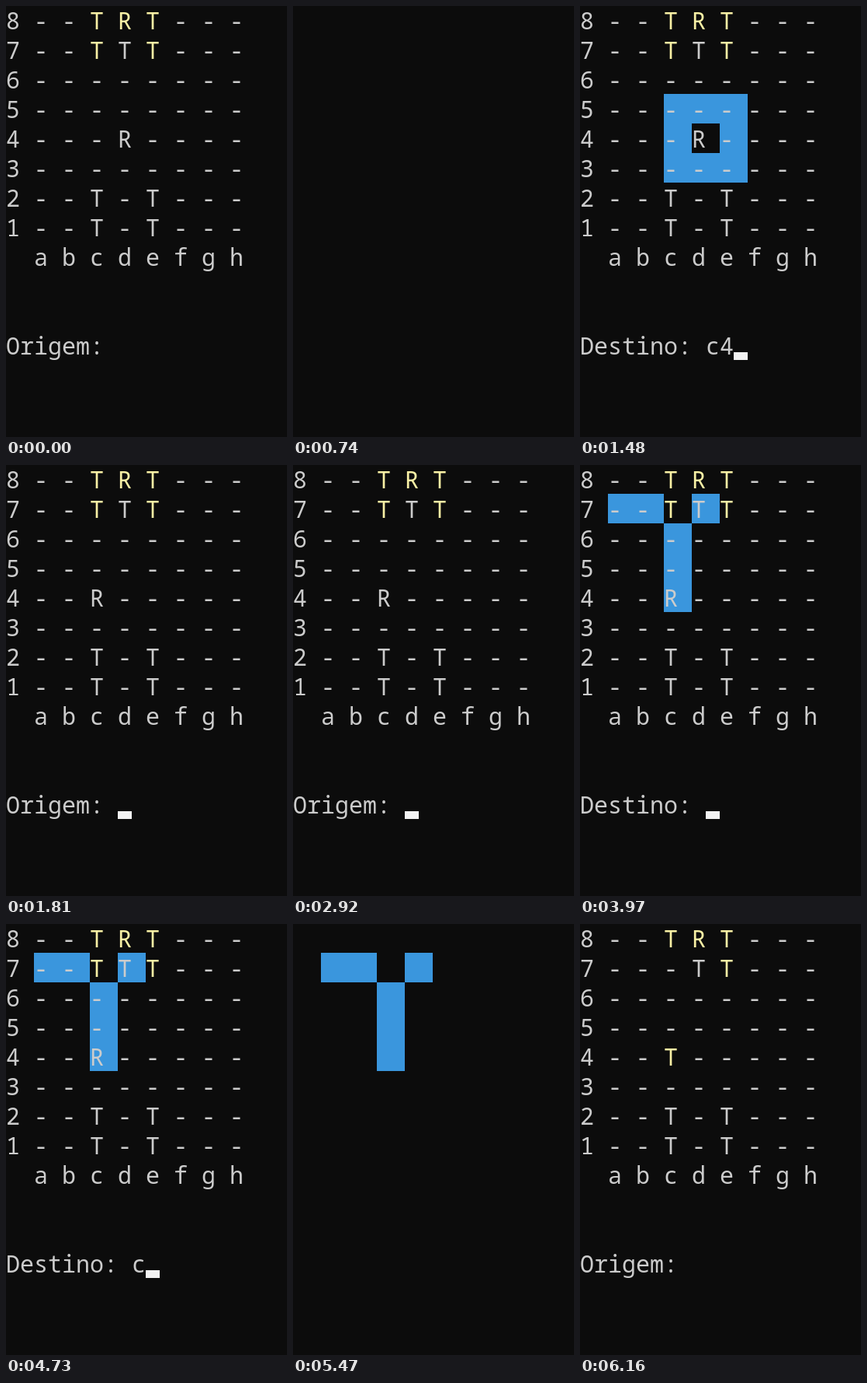
Animation of 362x554 px, one loop 6.44 s. Source, as an HTML page with a canvas:

```html
<!DOCTYPE html>
<html lang="pt">
<head>
<meta charset="utf-8">
<style>
html, body { margin: 0; width: 100%; height: 100%; overflow: hidden; background: #0c0c0c; }
canvas { display: block; }
</style>
</head>
<body>
<canvas width="362" height="554"></canvas>
<script>
const ctx = document.querySelector('canvas').getContext('2d');
const LOOP = 6440, CHAR = 18, LINE = 38;
const GREY = '#cccccc', YELLOW = '#f9f1a5', BLUE = '#3a96dd';

// Board rows 8 to 1; lowercase pieces are the yellow side.
const board = (row7, row4) =>
  ['--trt---', row7, '--------', '--------', row4, '--------', '--T-T---', '--T-T---'];
const start = board('--tTt---', '---R----');
const moved = board('--tTt---', '--R-----');
const taken = board('---Tt---', '--t-----');

const kingMoves = 'c5 d5 e5 c4 e4 c3 d3 e3'.split(' ');
const rookMoves = 'a7 b7 d7 c6 c5 c4'.split(' ');

// [start ms, board, marked squares, prompt, cursor visible]
const steps = [
  [0, start, [], 'Origem: ', false],
  [230, start, [], 'Origem: d', true],
  [410, start, [], 'Origem: d4', true],
  [740, null, []],
  [790, start, kingMoves, 'Destino: ', true],
  [1150, start, kingMoves, 'Destino: c', true],
  [1350, start, kingMoves, 'Destino: c', false],
  [1480, start, kingMoves, 'Destino: c4', true],
  [1710, null, kingMoves],
  [1760, moved, [], 'Origem: ', false],
  [1810, moved, [], 'Origem: ', true],
  [2410, moved, [], 'Origem: ', false],
  [2920, moved, [], 'Origem: ', true],
  [3280, moved, [], 'Origem: c', true],
  [3510, moved, [], 'Origem: c', false],
  [3610, moved, [], 'Origem: c7', true],
  [3890, null, []],
  [3930, moved, rookMoves, 'Destino: ', false],
  [3970, moved, rookMoves, 'Destino: ', true],
  [4450, moved, rookMoves, 'Destino: ', false],
  [4600, moved, rookMoves, 'Destino: c', false],
  [4730, moved, rookMoves, 'Destino: c', true],
  [5060, moved, rookMoves, 'Destino: c', false],
  [5110, moved, rookMoves, 'Destino: c4', true],
  [5470, null, rookMoves],
  [5520, taken, [], 'Origem: ', true],
  [6160, taken, [], 'Origem: ', false]
];

function box(x, y, w, h, color) {
  ctx.fillStyle = color;
  ctx.fillRect(x, y, w, h);
}

function print(text, col, row, color = GREY) {
  ctx.fillStyle = color;
  ctx.fillText(text, col * CHAR, row * LINE + 30);
}

function draw(now) {
  const t = now % LOOP;
  const [, rows, marks, prompt, cursor] = steps.findLast(s => s[0] <= t);

  box(0, 0, 362, 554, '#0c0c0c');
  for (const [file, rank] of marks) {
    const col = 'abcdefgh'.indexOf(file) + 1;
    box(col * 2 * CHAR, (8 - rank) * LINE - 1, 2 * CHAR, LINE, BLUE);
  }

  if (rows) {
    ctx.font = '30px "Noto Sans Mono", monospace';
    rows.forEach((line, r) => {
      print(8 - r, 0, r);
      [...line].forEach((p, c) =>
        print(p.toUpperCase(), 2 * c + 2, r, p === p.toUpperCase() ? GREY : YELLOW));
    });
    print('a b c d e f g h', 2, 8);
    print(prompt, 0, 11);
    if (cursor) box(prompt.length * CHAR, 445, CHAR, 10, '#f2f2f2');
  }
}

const begin = performance.now();
function frame() {
  draw(performance.now() - begin);
  requestAnimationFrame(frame);
}
frame();
</script>
</body>
</html>
```
